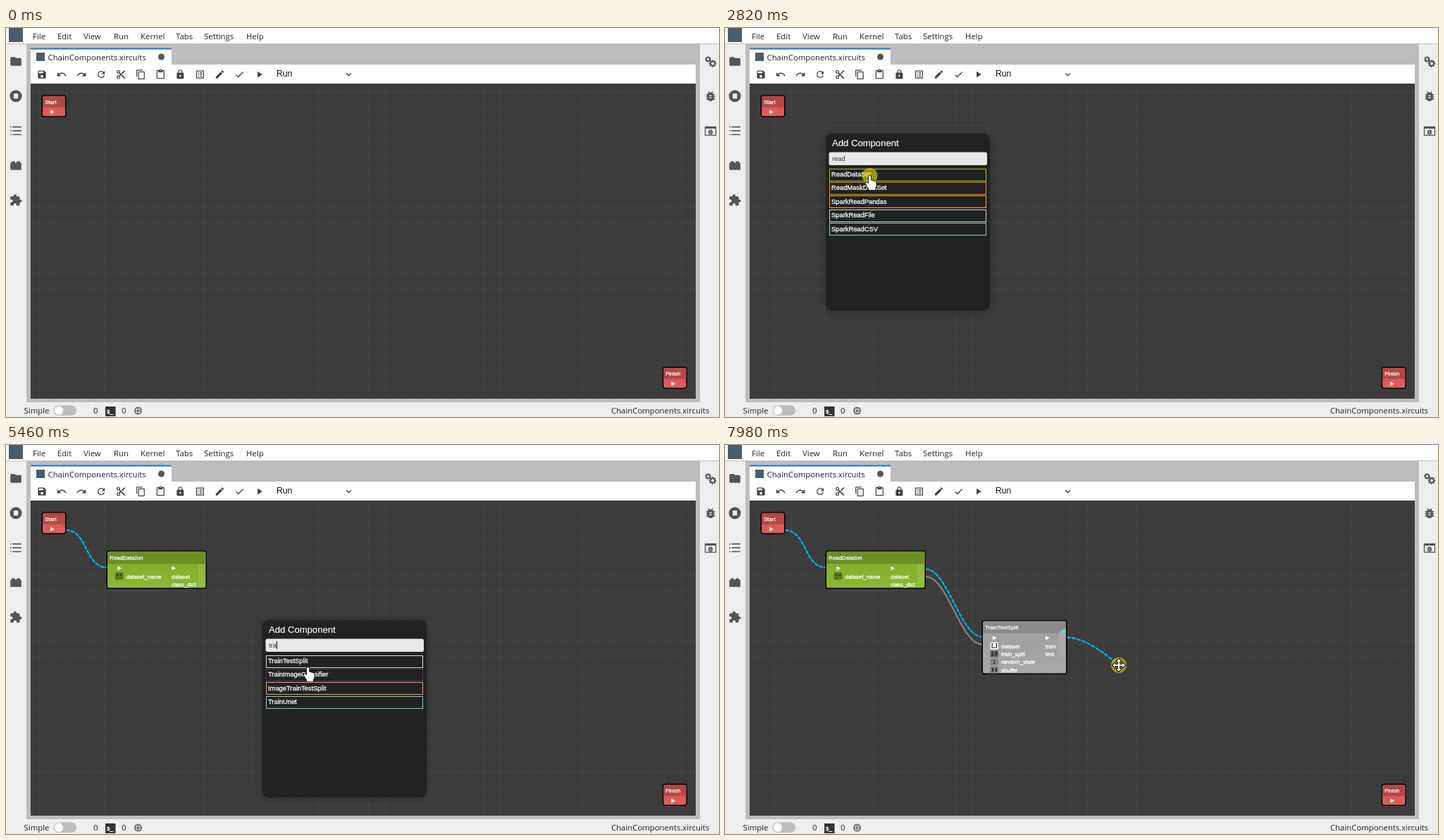
These frames come from a looping animation (1012x553 px, 8000 ms). An HTML page with a canvas:

```html
<!DOCTYPE html>
<html lang="en">
<head>
<meta charset="utf-8">
<title>Component chaining</title>
<style>
html, body { margin: 0; width: 1012px; height: 553px; overflow: hidden; background: #eee; }
canvas { display: block; }
</style>
</head>
<body>
<canvas id="stage" width="1012" height="553"></canvas>
<script>
const g = document.getElementById('stage').getContext('2d');
const LOOP = 8000, STEP = 70, FIRST = 280;
const UI = '"Open Sans", "Noto Sans", sans-serif';
const ARIAL = '"Liberation Sans", Arial, sans-serif';
const BLUE = '#00b8f4';

const ICONS = {
  save: 'M17 3H5a2 2 0 0 0-2 2v14a2 2 0 0 0 2 2h14a2 2 0 0 0 2-2V7l-4-4zm-5 16a3 3 0 1 1 0-6 3 3 0 0 1 0 6zm3-10H5V5h10v4z',
  undo: 'M12.5 8c-2.65 0-5.05.99-6.9 2.6L2 7v9h9l-3.62-3.62c1.39-1.16 3.16-1.88 5.12-1.88 3.54 0 6.55 2.31 7.6 5.5l2.37-.78C21.08 11.03 17.15 8 12.5 8z',
  reload: 'M17.65 6.35A7.96 7.96 0 0 0 12 4a8 8 0 1 0 7.73 10h-2.08A6 6 0 1 1 12 6c1.66 0 3.14.69 4.22 1.78L13 11h7V4l-2.35 2.35z',
  cut: 'M9.64 7.64c.23-.5.36-1.05.36-1.64a4 4 0 1 0-4 4c.59 0 1.14-.13 1.64-.36L10 12l-2.36 2.36C7.14 14.13 6.59 14 6 14a4 4 0 1 0 4 4c0-.59-.13-1.14-.36-1.64L12 14l7 7h3v-1L9.64 7.64zM6 8a2 2 0 1 1 0-4 2 2 0 0 1 0 4zm0 12a2 2 0 1 1 0-4 2 2 0 0 1 0 4zM19 3l-6 6 2 2 7-7V3z',
  copy: 'M16 1H4a2 2 0 0 0-2 2v14h2V3h12V1zm3 4H8a2 2 0 0 0-2 2v14a2 2 0 0 0 2 2h11a2 2 0 0 0 2-2V7a2 2 0 0 0-2-2zm0 16H8V7h11v14z',
  paste: 'M19 2h-4.18a3 3 0 0 0-5.64 0H5a2 2 0 0 0-2 2v16a2 2 0 0 0 2 2h14a2 2 0 0 0 2-2V4a2 2 0 0 0-2-2zm-7 0a1 1 0 1 1 0 2 1 1 0 0 1 0-2zm7 18H5V4h2v3h10V4h2v16z',
  lock: 'M18 8h-1V6A5 5 0 0 0 7 6v2H6a2 2 0 0 0-2 2v10a2 2 0 0 0 2 2h12a2 2 0 0 0 2-2V10a2 2 0 0 0-2-2zm-6 9a2 2 0 1 1 0-4 2 2 0 0 1 0 4zm3.1-9H8.9V6a3.1 3.1 0 0 1 6.2 0v2z',
  log: 'M3 3h18v18H3zM5 5v14h14V5zM11 7h6v2h-6zm0 4h6v2h-6zm0 4h6v2h-6zM7 7h2v2H7zm0 4h2v2H7zm0 4h2v2H7z',
  edit: 'M3 17.25V21h3.75L17.81 9.94l-3.75-3.75L3 17.25zM20.71 7.04a1 1 0 0 0 0-1.41l-2.34-2.34a1 1 0 0 0-1.41 0l-1.83 1.83 3.75 3.75 1.83-1.83z',
  check: 'M9 16.17L4.83 12l-1.42 1.41L9 19 21 7l-1.41-1.41z',
  play: 'M8 5v14l11-7z',
  chevron: 'M7.41 8.59L12 13.17l4.59-4.58L18 10l-6 6-6-6z',
  folder: 'M10 4H4a2 2 0 0 0-2 2v12a2 2 0 0 0 2 2h16a2 2 0 0 0 2-2V8a2 2 0 0 0-2-2h-8l-2-2z',
  stop: 'M12 1a11 11 0 1 0 0 22 11 11 0 0 0 0-22zM8 7.5h8v9H8z',
  list: 'M2 4h2v2H2zm0 7h2v2H2zm0 7h2v2H2zM6 4h16v2H6zm0 7h16v2H6zm0 7h16v2H6z',
  brick: 'M2 7h2.5V4.5h6V7h3V4.5h6V7H22v13H2z',
  puzzle: 'M20.5 11H19V7a2 2 0 0 0-2-2h-4V3.5a2.5 2.5 0 0 0-5 0V5H4a2 2 0 0 0-2 2v3.8h1.5a2.7 2.7 0 0 1 0 5.4H2V20a2 2 0 0 0 2 2h3.8v-1.5a2.7 2.7 0 0 1 5.4 0V22H17a2 2 0 0 0 2-2v-4h1.5a2.5 2.5 0 0 0 0-5z',
  bug: 'M20 8h-2.81c-.45-.78-1.07-1.45-1.82-1.96L17 4.41 15.59 3l-2.17 2.17a6 6 0 0 0-2.83 0L8.41 3 7 4.41l1.62 1.63C7.88 6.55 7.26 7.22 6.81 8H4v2h2.09c-.05.33-.09.66-.09 1v1H4v2h2v1c0 .34.04.67.09 1H4v2h2.81a6 6 0 0 0 10.38 0H20v-2h-2.09c.05-.33.09-.66.09-1v-1h2v-2h-2v-1c0-.34-.04-.67-.09-1H20V8zm-6 8h-4v-2h4v2zm0-4h-4v-2h4v2z',
  chip: 'M15 9H9v6h6V9zm-2 4h-2v-2h2v2zm8-2V9h-2V7a2 2 0 0 0-2-2h-2V3h-2v2h-2V3H9v2H7a2 2 0 0 0-2 2v2H3v2h2v2H3v2h2v2a2 2 0 0 0 2 2h2v2h2v-2h2v2h2v-2h2a2 2 0 0 0 2-2v-2h2v-2h-2v-2h2zm-4 6H7V7h10v10z'
};
const HAND = new Path2D('M0 0a1.7 1.7 0 0 1 1.7 1.7V7l1-.5 1.6.7.8.2 1.6.5 1 .4 1.2 1 .2 1.7v3.8l-1.5 3v2.4H-1.6v-2L-5 12.6-6.3 10.5-5.6 9.4-4.2 9.5-1.7 11.5V1.7A1.7 1.7 0 0 1 0 0z');

function rect(x, y, w, h, fill) {
  g.fillStyle = fill;
  g.fillRect(x, y, w, h);
}
function round(x, y, w, h, r, fill) {
  g.beginPath();
  g.roundRect(x, y, w, h, r);
  g.fillStyle = fill;
  g.fill();
}
function disc(x, y, r, fill) {
  g.beginPath();
  g.arc(x, y, r, 0, Math.PI * 2);
  g.fillStyle = fill;
  g.fill();
}
function text(s, x, y, size, color, font = ARIAL, weight = 0) {
  g.font = size + 'px ' + font;
  g.fillStyle = color;
  g.fillText(s, x, y);
  if (weight) {
    g.strokeStyle = color;
    g.lineWidth = weight;
    g.strokeText(s, x, y);
  }
}
function icon(name, x, y, size, color = '#555', flip = 1) {
  g.save();
  g.translate(x, y);
  g.scale(flip * size / 24, size / 24);
  g.translate(-12, -12);
  g.fillStyle = color;
  g.fill(new Path2D(ICONS[name]), 'evenodd');
  g.restore();
}
function gear(x, y, r) {
  g.beginPath();
  for (let i = 0; i < 32; i++) {
    const a = i * Math.PI / 16, d = i % 4 < 2 ? r : r * 0.74;
    g.lineTo(x + d * Math.cos(a), y + d * Math.sin(a));
  }
  g.closePath();
  g.moveTo(x + r * 0.36, y);
  g.arc(x, y, r * 0.36, 0, Math.PI * 2);
  g.fillStyle = '#555';
  g.fill('evenodd');
}

function drawFrame() {
  rect(0, 0, 1012, 553, '#eee');
  rect(0, 0, 1012, 22, '#fff');
  rect(0, 22, 1012, 1, '#bdbdbd');
  rect(29, 23, 956, 509, '#bdbdbd');
  rect(4, 0, 20, 20, '#4b5d6b');
  [['File', 38], ['Edit', 73], ['View', 110], ['Run', 153], ['Kernel', 191], ['Tabs', 241], ['Settings', 281], ['Help', 341]]
    .forEach(([s, x]) => text(s, x, 16, 11.4, '#222', UI));

  rect(35, 29, 200, 23, '#fff');
  rect(35, 28.5, 200, 2, '#1976d2');
  rect(43, 35, 12, 12, '#4b5d6b');
  text('ChainComponents.xircuits', 59.5, 45.5, 11.35, '#222', UI);
  disc(220.5, 41, 4.5, '#555');

  rect(35, 52, 944, 27, '#fff');
  ['save', 'undo', 'undo', 'reload', 'cut', 'copy', 'paste', 'lock', 'log', 'edit', 'check', 'play']
    .forEach((n, i) => icon(n, 51 + i * 28.05, 66, 15, '#444', i === 2 ? -1 : 1));
  text('Run', 384, 69, 12.16, '#111');
  icon('chevron', 486.5, 66, 15, '#333');

  ['folder', 'stop', 'list', 'brick', 'puzzle'].forEach((n, i) => icon(n, 14, 47.5 + i * 49.3, 18.7));
  gear(996.5, 44.5, 4.6);
  gear(1003, 50.5, 5.6);
  icon('bug', 1000, 97, 18.7);
  g.strokeStyle = '#555';
  g.lineWidth = 1.3;
  g.strokeRect(992.5, 140.5, 15, 12);
  rect(992, 140, 16, 3, '#555');
  icon('bug', 1000, 148, 10);

  text('Simple', 25.5, 548, 11.4, '#222', UI);
  round(67.5, 536.5, 32.5, 14.5, 7.2, '#bdbdbd');
  disc(75, 543.8, 6.2, '#fff');
  text('0', 124, 548, 11.4, '#222', UI);
  rect(141, 538, 14.5, 14, '#333');
  text('$_', 143, 548, 8, '#fff', ARIAL, 0.3);
  text('0', 164, 548, 11.4, '#222', UI);
  icon('chip', 187.5, 544, 15);
  text('ChainComponents.xircuits', 859, 548, 11.35, '#222', UI);

  rect(35, 79, 944, 448, '#3c3c3c');
  for (let x = 46.5; x < 979; x += 23.375) rect(x, 79, 1, 448, 'rgba(255,255,255,.04)');
  for (let y = 90.4; y < 527; y += 23.375) rect(35, y, 944, 1, 'rgba(255,255,255,.04)');
}

function node(x, y, w, h, headH, name, head, body) {
  round(x, y, w, h, 4, '#000');
  g.save();
  g.beginPath();
  g.roundRect(x + 1.5, y + 1.5, w - 3, h - 3, 2.5);
  g.clip();
  const fill = g.createLinearGradient(0, y, 0, y + h);
  fill.addColorStop(0.3, body[0]);
  fill.addColorStop(1, body[1]);
  rect(x, y, w, h, fill);
  rect(x, y, w, headH, head);
  g.restore();
  text(name, x + 4.5, y + 12.8, 7.9, '#fff', ARIAL, 0.25);
}
function label(s, x, y) { text(s, x, y, 7.9, '#fff', ARIAL, 0.3); }
function arrow(x, y) {
  g.beginPath();
  g.moveTo(x - 2.6, y - 3);
  g.lineTo(x + 3.2, y);
  g.lineTo(x - 2.6, y + 3);
  g.fillStyle = '#fff';
  g.fill();
}
function terminal(x, y, name) {
  node(x, y, 35, 31.5, 17.5, name, '#b44747', ['#d55555', '#df5f5f']);
  arrow(x + 15.2, y + 24.3);
}

function readNode() {
  node(142.5, 150, 142.5, 54.5, 19, 'ReadDataSet', '#6c8f24', ['#83ae2b', '#8cb830']);
  rect(273, 170, 9.5, 32, 'rgba(255,255,255,.09)');
  arrow(161, 175.3);
  arrow(238, 175.3);
  round(154.5, 181, 12, 10.5, 2, '#58781c');
  rect(157, 184, 2, 2, '#263608');
  rect(162, 184, 2, 2, '#263608');
  label('dataset_name', 170.5, 189.5);
  label('dataset', 235, 189.5);
  label('class_dict', 235, 200.7);
}
function splitNode(t) {
  node(364.5, 249, 121, 77, 18.5, 'TrainTestSplit', '#8b8b8b', ['#a0a0a0', '#a9a9a9']);
  rect(473.5, 268, 9.5, 34, 'rgba(255,255,255,.09)');
  if (t >= 7070) {
    g.save();
    g.beginPath();
    g.rect(474, 261, 9.5, 8);
    g.clip();
    disc(484, 272, 11, '#86bdca');
    g.restore();
  }
  arrow(382.5, 274.3);
  arrow(457.5, 274.3);
  [['dataset', '#fff'], ['train_split', '#62706c'], ['random_state', '#858585'], ['shuffle', '#7c7c7c']].forEach(([s, c], i) => {
    const y = 288.5 + i * 11.4;
    round(376.5, y - 8, 11.5, 10, 2, c);
    label(s, 392, y);
  });
  g.strokeStyle = '#222';
  g.lineWidth = 1.2;
  g.beginPath();
  g.moveTo(380.5, 282.5);
  g.lineTo(379, 282.5);
  g.lineTo(379, 288);
  g.lineTo(385.5, 288);
  g.lineTo(385.5, 282.5);
  g.lineTo(384, 282.5);
  g.stroke();
  text('1.0', 377.5, 299, 6.5, '#111', ARIAL, 0.3);
  text('1', 380.5, 310.5, 6.5, '#111', ARIAL, 0.2);
  rect(379, 317, 2, 5, '#222');
  rect(384, 317, 2, 5, '#222');
  label('train', 454.5, 288.5);
  label('test', 454.5, 299.5);
}

function link(x1, y1, x2, y2, t, { color = BLUE, loose = false } = {}) {
  g.save();
  g.beginPath();
  g.moveTo(x1, y1);
  g.bezierCurveTo(x1 + 31, y1, x2 - (loose ? 0 : 31), y2, x2, y2);
  g.strokeStyle = color;
  g.lineWidth = 2.1;
  if (color === BLUE) {
    g.setLineDash([6.1, 1.3]);
    g.lineDashOffset = 14.8 * (1 - t / 1000 % 1);
  }
  g.stroke();
  g.restore();
}

const ITEMS = [
  ['ReadDataSet', '#9acd32'], ['ReadMaskDataSet', '#ff8c1a'], ['SparkReadPandas', '#fdb02c'],
  ['SparkReadFile', '#d8d8d8'], ['SparkReadCSV', '#8fd0c6'], ['TrainTestSplit', '#d8d8d8'],
  ['TrainImageClassifier', '#5a2a62'], ['ImageTrainTestSplit', '#f09a66'], ['TrainUnet', '#7fd4ca']
];
const PANELS = [
  { x: 143, y: 150, open: 1680, close: 2940, word: 'read', typeAt: 1990, caretOff: 2550 },
  { x: 364, y: 249, open: 4620, close: 6160, word: 'tra', typeAt: 4830, caretOff: 5680 }
];
function panel(p, t) {
  const { x, y } = p;
  g.save();
  g.shadowColor = 'rgba(0,0,0,.35)';
  g.shadowBlur = 8;
  round(x, y, 233, 252, 9, '#222');
  g.restore();
  text('Add Component', x + 9, y + 17.7, 13.1, '#fff', ARIAL, 0.15);
  round(x + 4.5, y + 26.5, 224.5, 18.5, 2.5, '#e7e9e7');
  const count = t < p.typeAt ? 0 : Math.floor((t - p.typeAt) / 100) + 1;
  const query = p.word.slice(0, count);
  if (query) text(query, x + 9, y + 39, 9.35, '#333');
  else text('SEARCH', x + 15.5, y + 39, 9.35, '#999');
  if (t < p.caretOff) rect(x + 9 + g.measureText(query).width, y + 30, 1, 11, '#000');
  if (!query) return;
  ITEMS.filter(([s]) => s.toLowerCase().includes(query)).forEach(([s, c], i) => {
    const top = y + 49.5 + i * 19.45;
    g.strokeStyle = c;
    g.lineWidth = 1;
    g.strokeRect(x + 5.5, Math.round(top) + 0.5, 222, 17);
    text(s, x + 8, top + 11.5, 9.35, '#fff', ARIAL, 0.3);
  });
}

// Pointer runs: [time, x, y] points; each run is hidden outside its own span.
const RUNS = [
  { pts: [[280, 446, 475], [910, 82, 117], [1190, 81, 117], [1600, 144, 151], [1850, 144, 151]] },
  { hand: true, pts: [[2340, 158, 170], [2590, 205.5, 210], [2940, 205.5, 210]] },
  { pts: [[2940, 206, 211], [3570, 277, 172], [3790, 279.5, 172], [3860, 283, 175], [4410, 354, 240], [4550, 365, 250], [4690, 365, 250]] },
  { hand: true, pts: [[5180, 392, 290], [5390, 428, 316], [5530, 429, 316], [5740, 431, 310], [6160, 432, 310]] },
  { pts: [[6160, 432, 310], [6650, 464, 278.5], [6720, 464.5, 278.5], [6930, 482, 272], [7140, 483, 272], [7770, 535, 293], [7980, 559, 313], [8001, 559, 313]] }
];
const PRESSES = [
  { from: 1110, to: 1610, port: [85, 121] },
  { from: 2790, to: 2940 },
  { from: 3860, to: 4550, port: [285, 176] },
  { from: 6020, to: 6160 },
  { from: 7070, to: 8001, port: [485, 273.5] }
];
const active = t => s => t >= s.from && t < s.to;

function pointerAt(t) {
  const run = RUNS.find(r => t >= r.pts[0][0] && t < r.pts[r.pts.length - 1][0]);
  if (!run) return null;
  const i = run.pts.findIndex(p => t < p[0]);
  const [t0, x0, y0] = run.pts[i - 1], [t1, x1, y1] = run.pts[i];
  const u = (t - t0) / (t1 - t0), e = u * u * (3 - 2 * u);
  return { x: x0 + (x1 - x0) * e, y: y0 + (y1 - y0) * e, hand: run.hand };
}
function drawPointer(p, pressed) {
  if (pressed) disc(p.x, p.y, 11, 'rgba(230,220,0,.62)');
  g.save();
  g.translate(p.x, p.y);
  g.strokeStyle = '#000';
  g.fillStyle = '#fff';
  g.lineJoin = 'round';
  if (p.hand) {
    g.lineWidth = 1.6;
    g.stroke(HAND);
    g.fill(HAND);
  } else {
    g.beginPath();
    for (let i = 0; i < 4; i++) {
      [[1.1, -1.1], [1.1, -5.2], [3.6, -5.2], [0, -9], [-3.6, -5.2], [-1.1, -5.2]].forEach(([x, y]) => g.lineTo(x, y));
      g.rotate(-Math.PI / 2);
    }
    g.closePath();
    g.lineWidth = 2;
    g.stroke();
    g.fill();
  }
  g.restore();
}

function draw(t) {
  drawFrame();
  const pointer = pointerAt(t), press = PRESSES.find(active(t));
  if (t >= 2940) link(85, 121, 143, 174, t);
  if (t >= 6160) {
    link(285, 187, 365, 283.5, t, { color: '#868686' });
    link(285, 176.5, 365, 272.5, t);
  }
  if (press && press.port) link(...press.port, pointer.x - 3, pointer.y - 2, t, { loose: true });
  terminal(50.5, 95.2, 'Start');
  terminal(931.8, 481.5, 'Finish');
  if (t >= 2940) readNode();
  if (t >= 6160) splitNode(t);
  PANELS.filter(p => t >= p.open && t < p.close).forEach(p => panel(p, t));
  if (pointer) drawPointer(pointer, press);
}

const start = performance.now();
function tick() {
  const t = Math.max(0, performance.now() - start) % LOOP;
  draw(t < FIRST ? 0 : FIRST + Math.floor((t - FIRST) / STEP) * STEP);
  requestAnimationFrame(tick);
}
tick();
</script>
</body>
</html>
```
